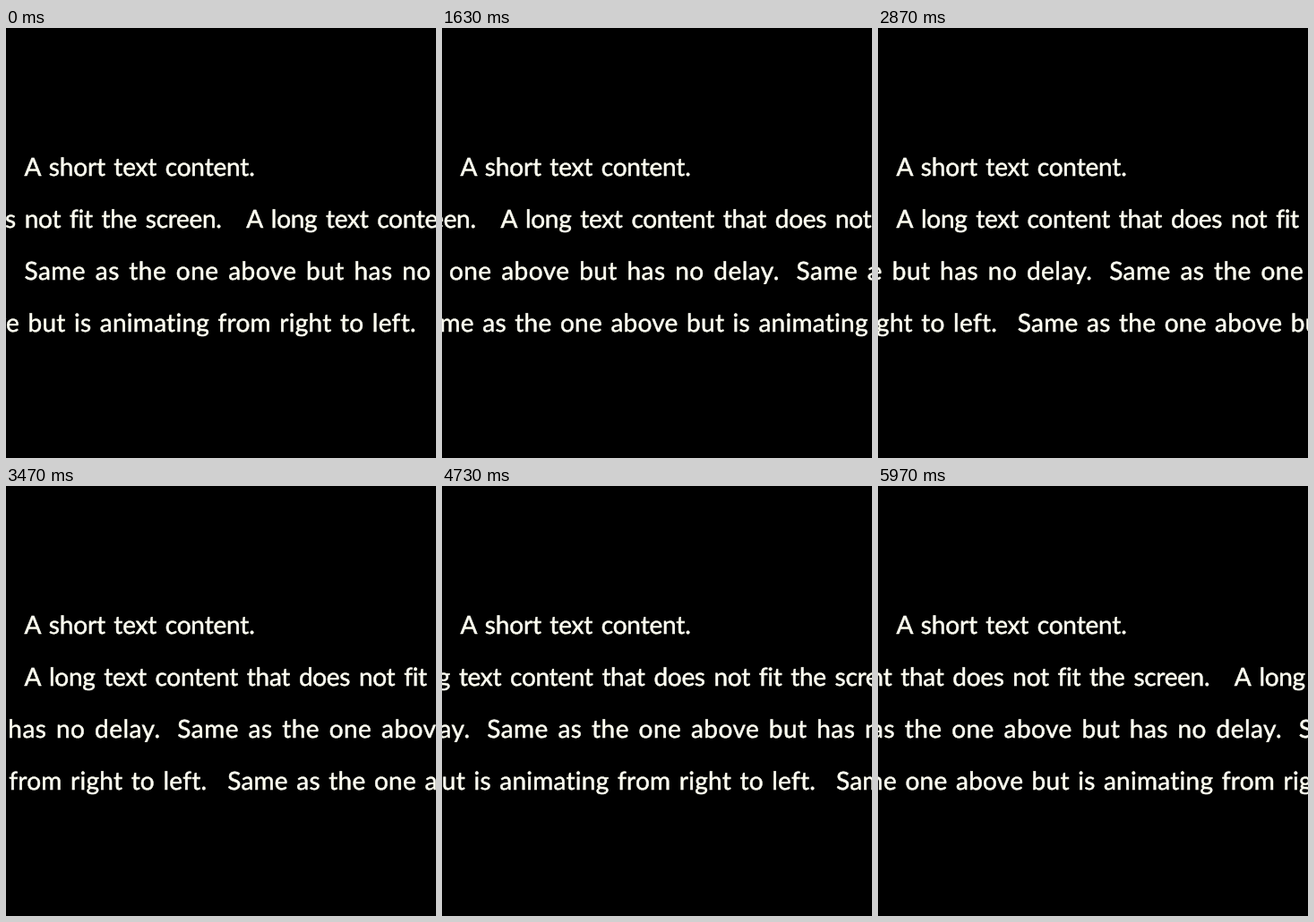
An HTML page that plays this animation: 480x480 px, repeating every 6010 ms.

```html
<!DOCTYPE html>
<html lang="en">
<head>
<meta charset="utf-8">
<title>Scrolling text</title>
<style>
  html, body { margin: 0; width: 100%; height: 100%; overflow: hidden; background: #000; }
  svg { display: block; width: 100%; height: 100%; }
  text {
    font: 28px Lato, "Open Sans", sans-serif;
    fill: #fffff2;
    stroke: #fffff2;
    stroke-width: 0.5px;
    text-rendering: geometricPrecision;
  }
</style>
</head>
<body>
<svg id="stage" viewBox="0 0 480 480"></svg>
<script>
const SVG_NS = "http://www.w3.org/2000/svg";
const LOOP = 6010;
const FRAME = 1000 / 30;
const LAP = 5000;
const PAUSE_START = 1995;
const PAUSE_END = 4005;

// Each row travels one period per lap; x gives its left edge at a time in ms.
const rows = [
  { text: "A short text content.", tracking: -0.17, gap: 2.5, period: 0, x: () => 20.5 },
  {
    text: "A long text content that does not fit the screen.",
    tracking: -0.31, gap: 3, period: 621,
    x: t => 20.5 - 621 / LAP * (Math.min(0, t - PAUSE_START) + Math.max(0, t - PAUSE_END)),
  },
  {
    text: "Same as the one above but has no delay.",
    tracking: 0.47, gap: 3, period: 557,
    x: t => 20.5 - 557 / LAP * t,
  },
  {
    text: "Same as the one above but is animating from right to left.",
    tracking: 0.26, gap: 2, period: 761,
    x: t => -280.5 + 761 / LAP * t,
  },
];

const stage = document.getElementById("stage");

function addText(row, y) {
  const node = document.createElementNS(SVG_NS, "text");
  node.textContent = row.text;
  node.setAttribute("y", y);
  node.style.letterSpacing = row.tracking + "px";
  node.style.wordSpacing = row.gap + "px";
  return stage.appendChild(node);
}

rows.forEach((row, i) => {
  const copies = row.period ? 2 : 1;
  row.nodes = Array.from({ length: copies }, () => addText(row, 165.2 + 57.8 * i));
});

function draw(time) {
  const t = Math.floor((time % LOOP + 5) / FRAME) * FRAME;
  for (const { nodes, period, x } of rows) {
    let left = x(t);
    if (period) {
      // Keep the first copy within one period left of the stage's edge.
      left = ((left % period) + period) % period - period;
    }
    nodes.forEach((node, i) => node.setAttribute("x", left + i * period));
  }
}

const start = performance.now();
function tick() {
  draw(performance.now() - start);
  requestAnimationFrame(tick);
}
tick();
</script>
</body>
</html>
```
